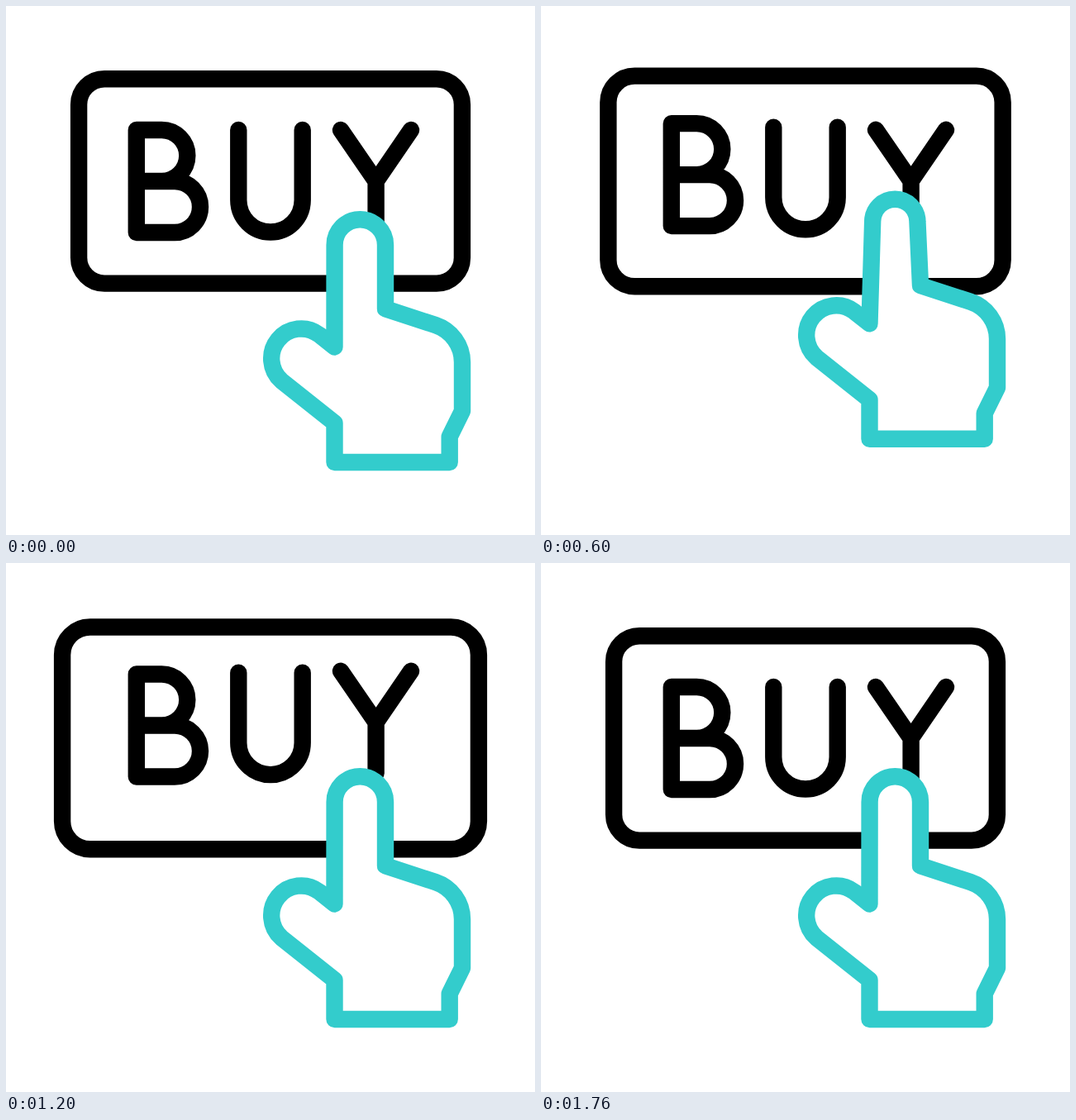
An HTML page that plays this animation: 640x640 px, repeating every 1.92 s.

```html
<!DOCTYPE html>
<html lang="en">
<head>
<meta charset="utf-8">
<title>Buy button</title>
<style>
  html, body { margin: 0; width: 100%; height: 100%; overflow: hidden; background: #fff; }
  svg { display: block; width: 100%; height: 100%; }
  path, rect {
    fill: none;
    stroke: #000;
    stroke-width: 20.4;
    stroke-linecap: round;
    stroke-linejoin: round;
  }
  #hand { fill: #fff; stroke: #3cc; }
</style>
</head>
<body>
<svg viewBox="0 0 640 640" role="img" aria-label="BUY">
  <rect id="frame"/>
  <path id="b" d="M157.8 150H188.3A31 31 0 0 1 188.3 212H157.8H204A31 31 0 0 1 204 274H157.8Z"/>
  <path id="u" d="M281.3 150V234.8A38.7 38.7 0 0 0 358.7 234.8V150"/>
  <path id="y" d="M405 150L447.6 212L490 150M447.6 212V273.5"/>
  <path id="hand"/>
</svg>
<script>
  const LOOP = 1920, STEP = 40;
  const el = id => document.getElementById(id);
  const frame = el('frame'), hand = el('hand');

  const ease = x => {
    x = Math.min(1, Math.max(0, x));
    return x * x / (x * x + (1 - x) * (1 - x));
  };

  // Rises from 0 to 1, holds, then falls back; all times in ms.
  const pulse = (t, riseStart, riseEnd, fallStart, fallEnd) =>
    ease((t - riseStart) / (riseEnd - riseStart)) -
    ease((t - fallStart) / (fallEnd - fallStart));

  const letters = [
    ['b', 378, 868, 1030, 1540],
    ['u', 440, 960, 1072, 1582],
    ['y', 556, 1080, 1182, 1692]
  ];

  const lift = (node, dy) => node.setAttribute('transform', `translate(0 ${-dy})`);

  function drawFrame(scale) {
    const w = 463.8 * scale, h = 247.4 * scale;
    const box = { x: 320 - w / 2, y: 211.9 - h / 2, width: w, height: h, rx: 31 * scale };
    for (const key in box) frame.setAttribute(key, box[key]);
  }

  // The fingertip radius narrows while the hand is raised.
  const handPath = r => `M397.5 412.5V412L${428.3 - r} 289
    A${r} ${r} 0 0 1 ${428.3 + r} 289L459 366.3L519.5 386
    A47.5 47.5 0 0 1 552 431V490L536.7 521V552H397.5V504.5L333.3 453.4
    A36 36 0 0 1 378.7 397.6Z`;

  function draw() {
    const t = Math.floor(performance.now() % LOOP / STEP) * STEP;
    drawFrame(1 + 0.0935 * pulse(t, 308, 1035, 1035, 1768));
    for (const [id, ...times] of letters) lift(el(id), 19.3 * pulse(t, ...times));
    lift(hand, 28.2 * pulse(t, 30, 615, 615, 1208));
    hand.setAttribute('d', handPath(30.7 - 3.6 * pulse(t, 240, 630, 630, 1010)));
    requestAnimationFrame(draw);
  }
  draw();
</script>
</body>
</html>
```
